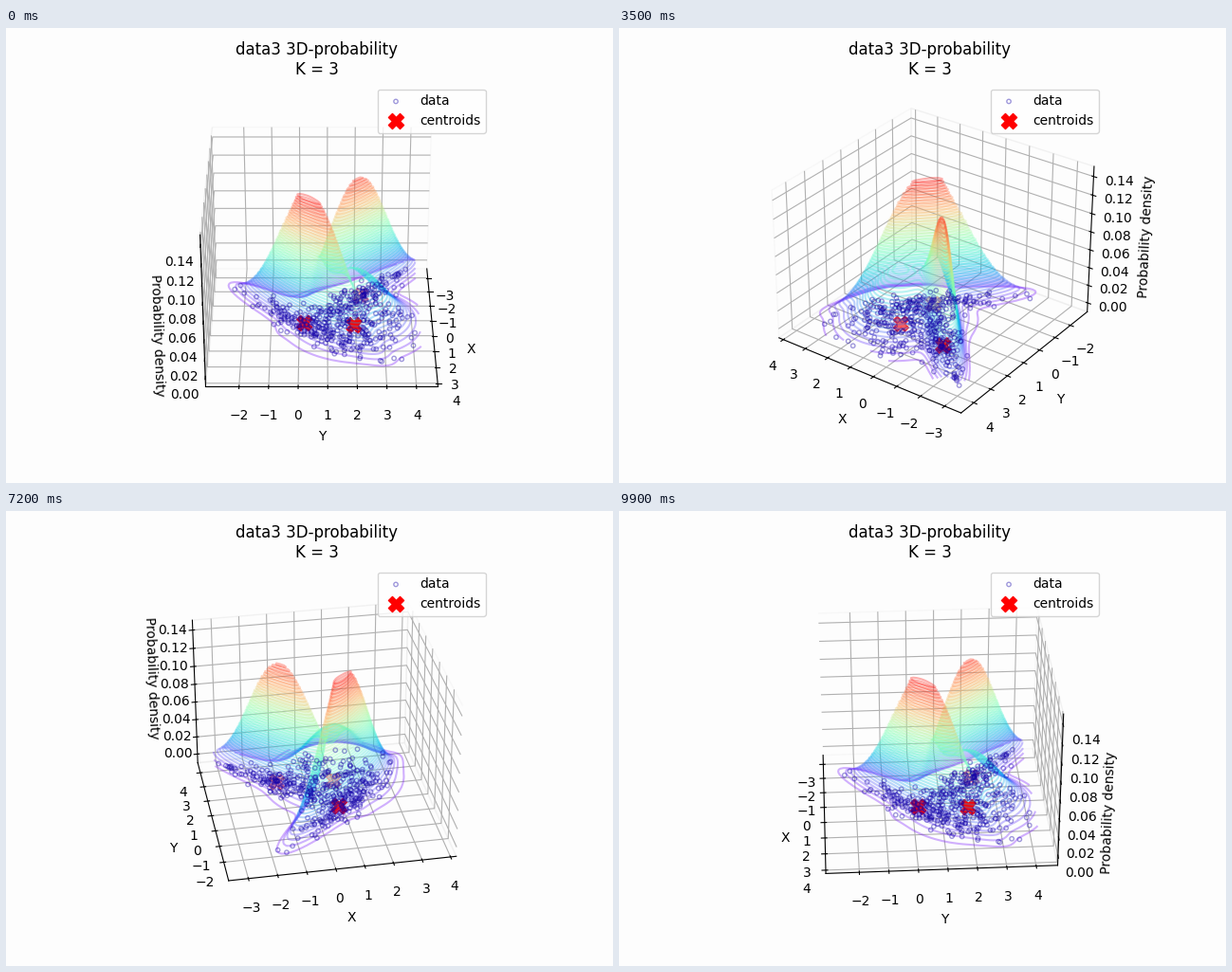
A matplotlib script for the animation above (10000 ms loop, 640 by 480 pixels).

```python
import numpy as np
import matplotlib.pyplot as plt
from matplotlib.animation import FuncAnimation

FRAMES = 100
PAPER = "#fdfdfd"
X_SPAN, Y_SPAN, Z_SPAN = (-3.17, 3.70), (-2.63, 4.23), (0, 0.1405)
PAD = 0.0729    # free space around the data, as a share of its span
STEP = 0.003    # height between two contour lines


def bump(x, y, centre, angle, long, short, height):
    """Tilted Gaussian hill."""
    a = np.radians(angle)
    dx, dy = x - centre[0], y - centre[1]
    u = dx * np.cos(a) + dy * np.sin(a)
    v = dy * np.cos(a) - dx * np.sin(a)
    return height * np.exp(-0.5 * ((u / long) ** 2 + (v / short) ** 2))


ridge, dome, wall = centres = [(0.77, 0.19), (0.91, 1.94), (-1.12, 2.21)]


def density(x, y):
    return (bump(x, y, ridge, 46.5, 1.38, 0.28, 0.124)
            + bump(x, y, dome, 60, 1.12, 1.02, 0.062)
            + bump(x, y, wall, 133, 1.25, 0.29, 0.125))


def sample(rng, tries=2900):
    """Random points spread according to the density."""
    x, y = rng.uniform(*X_SPAN, tries), rng.uniform(*Y_SPAN, tries)
    d = density(x, y)
    keep = (d > STEP) & (d > rng.uniform(*Z_SPAN, tries))
    return x[keep], y[keep]


def padded(span):
    gap = PAD * (span[1] - span[0])
    return span[0] - gap, span[1] + gap


fig = plt.figure(figsize=(6.4, 4.8), dpi=100, facecolor=PAPER)
ax = fig.add_subplot(projection="3d", facecolor=PAPER, computed_zorder=False)

gx, gy = np.meshgrid(np.linspace(*X_SPAN, 60), np.linspace(*Y_SPAN, 60))
ax.contour(gx, gy, density(gx, gy), levels=np.arange(STEP, Z_SPAN[1], STEP),
           cmap="rainbow", vmin=0, vmax=Z_SPAN[1], alpha=0.33, zorder=2)

ax.scatter(*sample(np.random.default_rng(3)), 0, s=10, facecolors="none",
           edgecolors=(0.07, 0, 0.66), linewidths=1, alpha=0.4, zorder=3,
           label="data")
ax.scatter(*np.transpose(centres), 0, s=135, c="red", marker="X", zorder=1,
           label="centroids")

ax.set(xlim=padded(X_SPAN), ylim=padded(Y_SPAN), zlim=padded(Z_SPAN),
       xticks=range(-3, 5), yticks=range(-2, 5),
       xlabel="X", ylabel="Y", zlabel="Probability density")
ax.set_title("data3 3D-probability\nK = 3")
for axis in (ax.xaxis, ax.yaxis, ax.zaxis):
    axis.pane.fill = False
ax.legend(loc="upper right")


def update(i):
    ax.view_init(elev=30, azim=i * 360 / FRAMES)
    return []


anim = FuncAnimation(fig, update, frames=FRAMES, interval=100, repeat=True)
plt.show()
```
